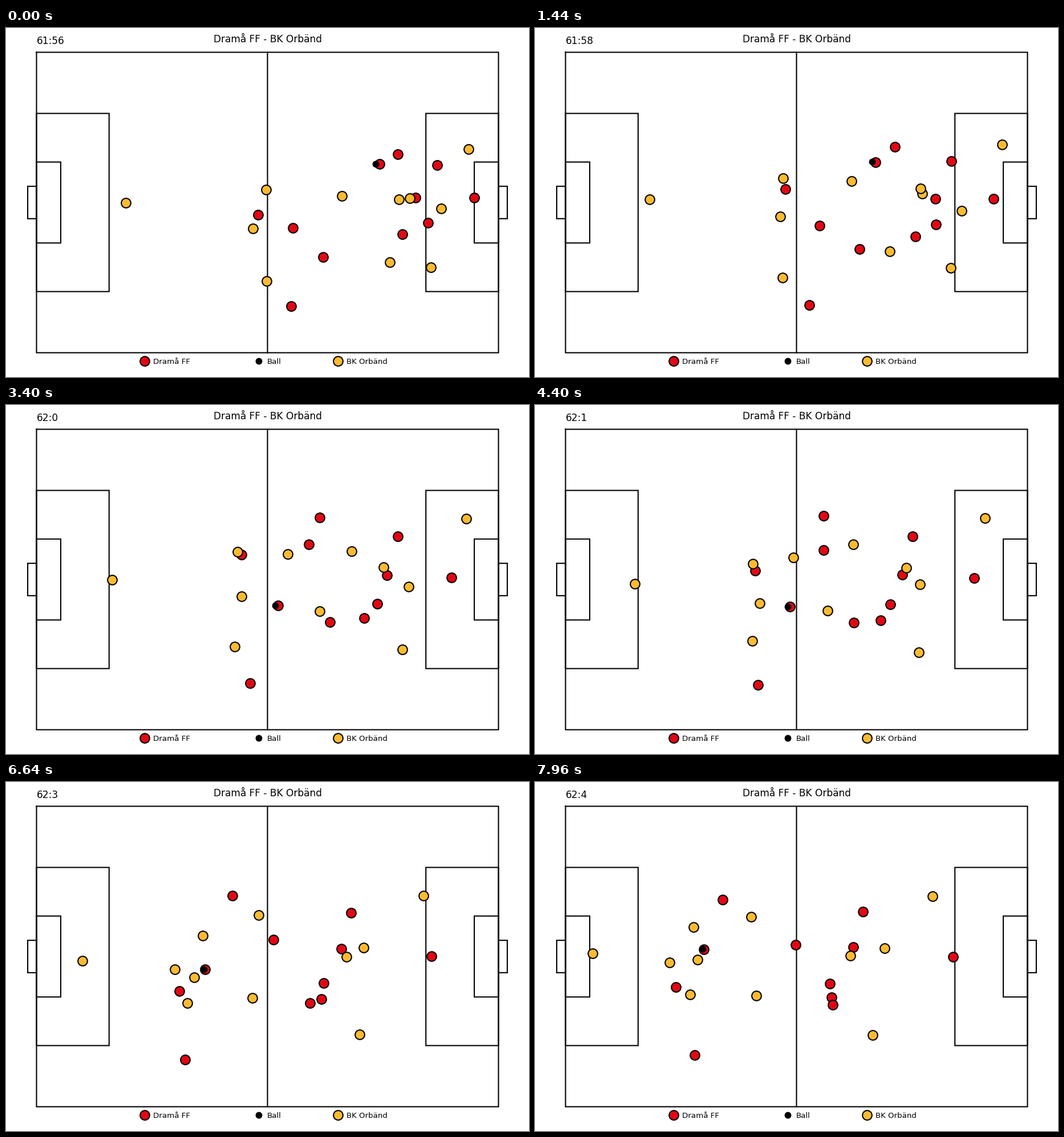
Write a matplotlib script that moves like this. It is 917 px wide and 611 px high and loops after 8 s.

```python
import numpy as np
import matplotlib.pyplot as plt
from matplotlib.animation import FuncAnimation

W, H, DPI = 917, 611, 100
FRAMES, STEP = 200, 40
RED, GOLD, INK = "#e30613", "#fbbb30", "black"
HOME, AWAY = "Dramå FF", "BK Orbänd"

plt.rcParams["font.family"] = "DejaVu Sans"
U = np.linspace(0, 1, FRAMES)[:, None]


def run(start, end, *waves):
    """Straight run from start to end, bent by sine waves of rising order."""
    pos = np.array(start) * (1 - U) + np.array(end) * U
    for k, wave in enumerate(waves, 1):
        pos = pos + np.sin(k * np.pi * U) * wave
    return pos


# The ball stays close to a carrier; one pass moves it to the next one
passer = run((655, 238.5), (457, 285.5), (-40, -12), (0, -6))
receiver = run((503.5, 350), (296, 293), (58, 32), (7, -12), (-4, 0))
seconds = U * (FRAMES - 1) * STEP / 1000
share = np.clip((seconds - 1.8) / 1.2, 0, 1)
ball = passer * (1 - share) + receiver * share
ball = ball - np.hstack([4 + 2.5 * np.cos(np.pi * U), 0.5 + 0 * U])

home = np.stack([
    run((821.5, 297), (733, 306), (-2, 1.5)),                       # keeper
    run((756.5, 240), (575.5, 227), (7, -3.5), (3.5, -2)),          # defence
    run((718.5, 297.5), (558, 289.5), (16.5, 4.5), (5, 1)),
    run((740, 341), (517, 353.5), (6.5, 2)),
    run((695, 361.5), (520.5, 377), (8, 7), (0, -3)),               # midfield
    run((556, 401.5), (522, 390), (24.5, -15), (7, -4)),
    passer,
    receiver,
    run((687, 221), (329.5, 206), (17, -18)),                       # attack
    run((500, 487), (280.5, 478), (17.5, 7), (12.5, -4.5)),
    run((442.5, 327.5), (247.5, 359.5), (54, -57), (3, -34), (0, 11)),
])

away = np.stack([
    run((210.5, 306.5), (101.5, 300), (24.5, 7), (-3, -10)),        # keeper
    run((457.5, 443), (272, 372), (25.5, 10.5), (-4, 2)),           # defence
    run((433, 351.5), (285, 311.5), (44, 11.5), (1, -22)),
    run((456, 283), (236.5, 316), (45.5, -23), (-4, -24), (-2, 9)),
    run((589, 294), (278, 254), (38, -9), (3, -15)),                # midfield
    run((689.5, 300), (613.5, 291.5), (4.5, -10.5), (1.5, -3)),
    run((708.5, 298.5), (379.5, 236), (35, -18), (9.5, 4)),
    run((673, 410), (388.5, 374.5), (-2, -26), (2, -5), (0, 7)),
    run((763.5, 316), (553, 304.5), (31, 6.5), (6.5, 3.5)),         # attack
    run((811.5, 212), (697, 200), (43.5, -7), (5.5, -1.5)),
    run((745, 419.5), (592, 443.5), (14.5, 0), (4.5, -3.5)),
])

# Pixel coordinates, with whole numbers at pixel centres of the rows above left
fig = plt.figure(figsize=(W / DPI, H / DPI), dpi=DPI, facecolor="white")
ax = fig.add_axes([0, 0, 1, 1])
ax.set_xlim(0.5, W + 0.5)
ax.set_ylim(H + 0.5, 0.5)
ax.axis("off")

# Pitch of 105 by 68 metres
LEFT, TOP, WIDE, HIGH = 54, 43, 810, 526
MX, MY = WIDE / 105, HIGH / 68
MID = TOP + HIGH / 2


def line(xs, ys):
    ax.plot(xs, ys, color=INK, lw=1.5, solid_joinstyle="miter", snap=False, zorder=1)


def box(x0, depth, half):
    """Rectangle from a goal line, with depth and half width in metres."""
    x1 = x0 + depth * MX
    y0, y1 = MID - half * MY, MID + half * MY
    line([x0, x1, x1, x0, x0], [y0, y0, y1, y1, y0])


box(LEFT, 105, 34)
line([LEFT + WIDE / 2] * 2, [TOP, TOP + HIGH])
for depth, half in ((16.5, 20.16), (5.5, 9.16), (-2, 3.66)):
    box(LEFT, depth, half)
    box(LEFT + WIDE, -depth, half)


def dots(points, color, size, edge, z):
    return ax.scatter(*np.transpose(points), s=size ** 2, color=color,
                      edgecolors=INK, linewidths=edge, zorder=z)


ax.text(W / 2 + 0.5, 25.5, f"{HOME} - {AWAY}", size=12.25, ha="center", va="baseline")
clock = ax.text(54.5, 28.5, "", size=12.25, va="baseline")

STYLES = ((RED, 12, 1.5), (INK, 8, 0.5), (GOLD, 12, 1.5))
for x, name, style in zip((243, 443, 582), (HOME, "Ball", AWAY), STYLES):
    dots([(x, 583.5)], *style, 2)
    ax.text(x + 15.5, 588.5, name, size=9.65, va="baseline")

groups = (home, ball[None], away)
layers = [dots(group[:, 0], *style, 3 + i)
          for i, (group, style) in enumerate(zip(groups, STYLES))]


def draw(frame):
    for layer, group in zip(layers, groups):
        layer.set_offsets(group[:, frame])
    secs = 61 * 60 + 56 + (frame * STEP + 600) // 1000
    clock.set_text(f"{secs // 60}:{secs % 60}")
    return [*layers, clock]


anim = FuncAnimation(fig, draw, frames=FRAMES, interval=STEP, repeat=True,
                     repeat_delay=0, blit=False)
plt.show()
```
